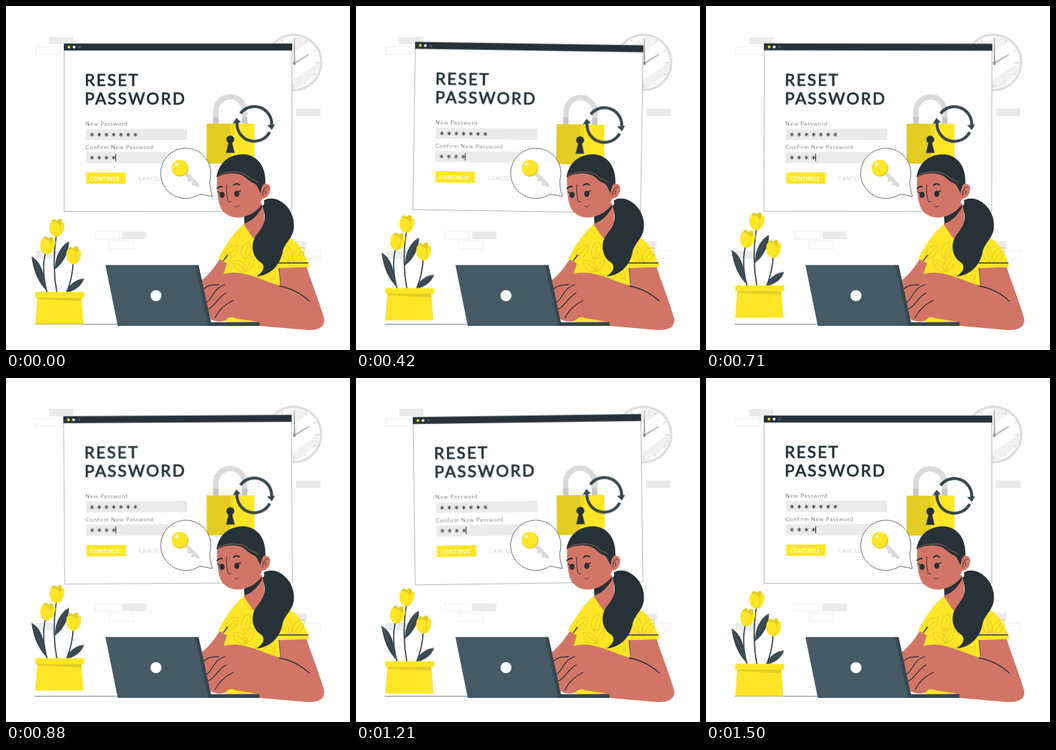
Write an HTML page that moves like this. It is 500x500 px and loops after 1540 ms.

```html
<!DOCTYPE html>
<html lang="en">
<head>
<meta charset="utf-8">
<title>Reset password</title>
<style>
  html, body { margin: 0; width: 100%; height: 100%; overflow: hidden; background: #fff; }
  svg { display: block; width: 100vw; height: 100vh; }
  text { font-family: Lato, sans-serif; fill: #263238; }
  .dark { fill: #263238; }
  .slate { fill: #37474f; }
  .yellow { fill: #ffe626; }
  .shade { fill: #e3cd22; }
  .skin { fill: #d27566; }
  .pale { fill: #ebebeb; }
  .box { fill: #fff; stroke: #ebebeb; stroke-width: .8; }
  .line { fill: none; stroke: #263238; stroke-width: 1; stroke-linecap: round; stroke-linejoin: round; }
  .thin { stroke-width: .6; }
  .thick { stroke-width: 2.2; }
  .stem { stroke-width: 1.8; stroke: #37474f; }
  .leafline { fill: none; stroke: #e3cd22; stroke-width: 1; }
  .title { font-size: 23.4px; letter-spacing: 2.3px; stroke: #263238; stroke-width: .9; stroke-linejoin: round; }
  .label { font-size: 8.4px; font-weight: 300; letter-spacing: .7px; }
  .btn { font-size: 7.6px; font-weight: 700; letter-spacing: .55px; }

  /* 1.5 s cycle followed by a 40 ms rest */
  #window { transform-origin: 250px 177px; animation: sway 1540ms linear infinite; }
  #plant { animation: lift 1540ms linear infinite; }
  @keyframes sway {
    0%, 97.4%, 100% { transform: rotate(0deg); }
    24.35% { transform: rotate(1deg); }
    73.05% { transform: rotate(-1deg); }
  }
  @keyframes lift {
    0%, 97.4%, 100% { transform: translateY(0); }
    48.7% { transform: translateY(-10px); }
  }
</style>
</head>
<body>
<svg viewBox="0 0 500 500">
  <defs>
    <path id="star" class="line" style="stroke-width:.9" d="M0-2.6V2.6M-2.3-1.3 2.3 1.3M-2.3 1.3 2.3-1.3"/>
    <g id="tulip">
      <path class="shade" d="M-6-12C-3-14-1-12 0-10C2-13 5-14 7-12C8-10 8-8 8-7L11-8C12 2 8 12 0 13L-8-9Z"/>
      <path class="yellow" d="M-9-8C-4-10 1-8 4-4C6 3 4 10-1 13C-8 12-13 3-9-8Z"/>
      <path class="yellow" d="M11-8C12 2 8 12 1 13C6 8 6 1 5-3C7-6 9-8 11-8Z"/>
    </g>
    <path id="sprig" class="leafline" d="M0 13C-9 5-7-7 3-13C10-4 9 7 0 13L2-7"/>
    <clipPath id="face"><circle cx="418" cy="82" r="38"/></clipPath>
  </defs>

  <g id="background">
    <g class="pale">
      <rect x="63" y="45" width="35" height="10.5"/>
      <rect x="169" y="328" width="35" height="11"/>
      <rect x="421.5" y="149" width="35.5" height="11"/>
      <rect x="43" y="356" width="35" height="11"/>
      <rect x="402" y="342" width="35" height="11"/>
    </g>
    <g class="box">
      <rect x="43.5" y="59" width="35" height="11.5"/>
      <rect x="129.5" y="328" width="35.5" height="11"/>
      <rect x="150" y="342" width="35" height="11.5"/>
      <rect x="422" y="356" width="35" height="11"/>
    </g>
    <circle cx="418" cy="82" r="42" fill="#dedede"/>
    <circle cx="418" cy="82" r="38.5" fill="#fff"/>
    <g clip-path="url(#face)" fill="#f1f1f1">
      <path d="M380 72 435 34 447 47 380 93ZM390 126 462 77 462 91 410 130Z"/>
    </g>
    <path d="M435 53 437 49.5M447 66 451 64M449 82.500H455M447 98 450 100M434 111 436 114M418 114V118M402 53 400 49" fill="none" stroke="#c4c4c4"/>
    <path d="M417 83 440 69.5 441 71 419 85Z" fill="#bdbdbd"/>
    <path d="M418.200 86 418.700 47H419.500L420.500 86Z" fill="#9a9a9a"/>
    <circle cx="419" cy="83" r="2" fill="#8f8f8f"/>
  </g>

  <g id="window">
    <rect x="84.250" y="55" width="331.5" height="243.200" fill="#fff" stroke="#263238" stroke-width=".35"/>
    <rect class="dark" x="84" y="54.700" width="332" height="10"/>
    <circle class="yellow" cx="91.5" cy="59.800" r="2"/>
    <circle fill="#fff" cx="99" cy="59.800" r="2"/>
    <circle fill="#455a64" cx="107" cy="59.800" r="1.900"/>

    <text class="title" x="114.500" y="116.100">RESET</text>
    <text class="title" x="114.500" y="143.100">PASSWORD</text>
    <text class="label" x="115.500" y="174.300">New Password</text>
    <text class="label" x="115.500" y="208.300">Confirm New Password</text>
    <rect class="pale" x="116" y="178.500" width="147.500" height="16.300"/>
    <rect class="pale" x="116" y="212.300" width="147.500" height="16.300"/>
    <g id="stars"></g>
    <path class="line" d="M159.500 215.500V225.500"/>
    <rect class="yellow" x="116.500" y="242" width="57.300" height="16.500"/>
    <text class="btn" x="122" y="253.500" style="fill:#fff">CONTINUE</text>
    <text class="btn" x="192.500" y="253.500" style="fill:#dedede">CANCEL</text>

    <path d="M305 171.500V153A21 21 0 0 1 347 153V171.500" fill="none" stroke="#dbdbdb" stroke-width="8"/>
    <path d="M301 161H309V171.500H301ZM343 161H351V171.500H343Z" fill="#c7c7c7"/>
    <rect class="shade" x="291.500" y="171" width="35" height="58"/>
    <rect class="yellow" x="326" y="171" width="35" height="58"/>
    <path class="shade" d="M326 171H333L326 229Z" opacity=".5"/>
    <path class="dark" d="M324 196H328L332.300 213.500H319.700Z"/>
    <circle class="dark" cx="326" cy="194" r="5.800"/>

    <g fill="none" stroke="#37474f" stroke-width="4.300">
      <path d="M340.800 156.100A25.300 25.300 0 0 1 386.200 173"/>
      <path d="M335.800 169A25.300 25.300 0 0 0 383.300 183.200"/>
    </g>
    <path class="slate" d="M379.500 173 391 172 386.500 180ZM329.500 171 341.500 169 335 162.500Z"/>
  </g>

  <g id="bubble">
    <path d="M296.200 254C296 262 298 270 300 277L282 273.300A36.500 36.500 0 1 1 296.200 254Z" fill="#fff" stroke="#263238" stroke-width=".7"/>
    <path d="M260 246 264 242 281 259 280.500 263 277 263 274 260 272 262 269 259 271 257 268 254 266 256 263 253 264.500 250.500Z" fill="#dbdbdb"/>
    <circle class="shade" cx="253" cy="236" r="12"/>
    <circle class="yellow" cx="252" cy="235" r="11.300"/>
    <ellipse cx="248" cy="230.500" rx="3" ry="2.300" fill="#fff9c8" transform="rotate(-45 248 230.500)"/>
  </g>

  <path class="line thin" d="M42 462.500H368"/>

  <g id="plant">
    <path class="line stem" d="M73 334C69 360 69 390 74 417M57 360C53 378 54 396 60 417M97.500 374C97 390 93 404 88 417"/>
    <g class="slate">
      <path d="M37 364C47 369 53 381 55 394L60 415C47 402 40 386 37 364Z"/>
      <path d="M91.500 342C92 358 84 373 71 383C71 365 79 349 91.500 342Z"/>
      <path d="M113.500 396C110 407 100 414 87 417C91 405 101 397 113.500 396Z"/>
    </g>
    <path d="M39 367C47 383 52 396 59 412M90 344C81 358 75 370 72 381M112 397C101 404 94 409 88 416" fill="none" stroke="#607d8b" stroke-width=".5"/>
    <use href="#tulip" transform="translate(73.500 322.500)"/>
    <use href="#tulip" transform="translate(60 348) rotate(8)"/>
    <use href="#tulip" transform="translate(98 362.500) rotate(-4)"/>
    <path class="yellow" d="M45.500 423H109.500L112.500 462.500H42.500Z"/>
    <path class="shade" d="M46 423.500H109.500L109 429 46 426Z"/>
    <rect class="yellow" x="42.500" y="415.500" width="71" height="8.500"/>
  </g>

  <g id="woman">
    <path class="skin" d="M312 366C304 378 296 390 284 399L292 420 330 400 322 371Z"/>
    <path class="yellow" d="M346 317C332 328 320 345 308.500 367L321 374 316 390 322 460H366L399 408 396 381 441 379.500C436 362 428 346 412 336L374 314Z"/>
    <g id="sprigs"></g>
    <path class="skin" d="M347 296 346 318C352 327 357 335 362 340C369 334 374 326 376 317L374 285Z"/>
    <path class="dark" d="M372 289C364 298 356 304 346 306L347 316C357 313 366 304 372 293Z"/>
    <path class="skin" d="M307 246C306 262 307 283 313 295C320 306 334 310 346 306C358 303 367 294 372 281L378 258 362 232 330 230Z"/>
    <path class="skin" d="M370 263C374 257 384 257 384 265C384 274 378 281 371 280Z"/>
    <path class="dark" d="M306 249C309 228 324 216 344 215.500C366 216 378 234 377 257C373 259 371 264 370 272C367 268 366 261 361 258C354 256 349 249 343 246C332 241 317 243 306 249Z"/>
    <path d="M308 247C323 238 345 240 352 248C357 253 363 252 367 257" fill="none" stroke="#d27566" stroke-width=".7"/>
    <path class="line" d="M380 263C375 264 373 269 373 275M376 268C378 269 378 271 377 273"/>
    <path class="dark" d="M374 283C382 277 396 279 406 289C415 298 419 309 418.500 321C418 337 405 344 402 357C399 377 383 392 364 393C373 388 378 379 371 373C360 367 355 351 361 338C366 328 377 320 376 306C376 297 371 291 374 283Z"/>
    <ellipse cx="373.500" cy="286" rx="1.800" ry="3.500" fill="#fff"/>

    <ellipse class="dark" cx="314" cy="274.500" rx="3.700" ry="4.600"/>
    <ellipse class="dark" cx="335.500" cy="273" rx="3.700" ry="4.600"/>
    <path class="line" d="M311 272 308 270M338 270 341 268.500" style="stroke-width:1.400"/>
    <path class="line thick" d="M307 265C309 263 311 262 314 262.500M331 260.500C334 258 337 258 339 260"/>
    <path class="line" d="M321 260C320 269 321 277 323 284C324 285 326 285 327 284M332 291C334 293 337 292 338.500 290"/>

    <path class="skin" d="M396 381 437 379.500C443 399 456 431 462 453C465 466 455 472 438 471L369 465 345 457 326 453C319 460 304 460 297 455L285 404C301 394 320 385 340 388C360 391 379 401 399 407Z"/>
    <path class="yellow" d="M318 459C321 453 326 451 334 454L366 459Z"/>
    <g class="line" style="stroke-width:1.300">
      <path d="M397 407C414 410 429 418 441 429"/>
      <path d="M394 373.500H439M316 370 322 362"/>
      <path d="M288 411C295 404 302 406 309 405M292 430C299 428 301 410 318 405M293 441C304 437 306 425 320 417M304 453C309 442 318 434 330 428"/>
      <path class="thin" d="M397 381 399 407"/>
    </g>
  </g>

  <g id="laptop">
    <path class="slate" d="M274 376.500H280L298 459.500H368.500V465H235V462L290 460Z"/>
    <path d="M144.500 376.500H275L294 465H162.500Z" fill="#455a64"/>
    <circle cx="218" cy="421" r="8" fill="#fff"/>
  </g>
</svg>
<script>
  const svgNS = "http://www.w3.org/2000/svg";

  function place(parent, id, transform) {
    const use = document.createElementNS(svgNS, "use");
    use.setAttribute("href", "#" + id);
    use.setAttribute("transform", transform);
    document.getElementById(parent).append(use);
  }

  const starRow = (count, y) => {
    for (let i = 0; i < count; i++) place("stars", "star", `translate(${125 + i * 10.5} ${y})`);
  };
  starRow(7, 187);
  starRow(4, 220.5);

  const sprigs = [
    [327, 357, 35], [348, 355, 10], [340, 379, -60], [352, 374, 25],
    [382, 388, -45], [408, 360, -20], [424, 361, 30], [364, 396, 60]
  ];
  for (const [x, y, turn] of sprigs) place("sprigs", "sprig", `translate(${x} ${y}) rotate(${turn})`);
</script>
</body>
</html>
```
